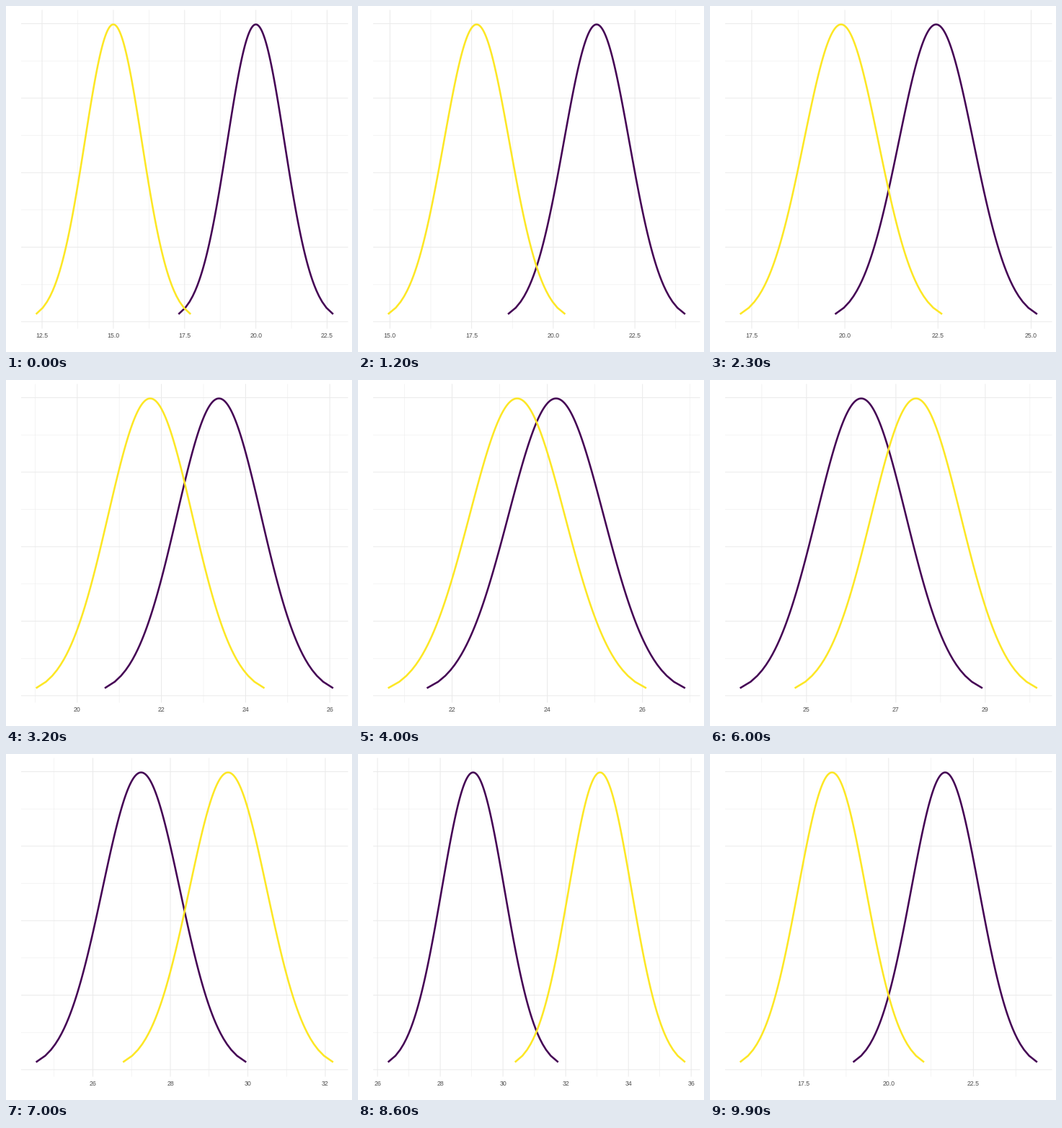
A matplotlib script for the animation above (10 s loop, 480 by 480 pixels).

```python
import numpy as np
import matplotlib.pyplot as plt
from matplotlib.animation import FuncAnimation

plt.rcParams["font.family"] = "Liberation Sans"
plt.rcParams["path.simplify"] = False

SIZE, DPI = 480, 72
FRAMES, INTERVAL = 100, 100
LEFT, RIGHT, TOP, BOTTOM = 21.0, 474.5, 5.5, 447.6
GRID, LABEL = "#EBEBEB", "#4D4D4D"
PURPLE, YELLOW = "#440154", "#FDE725"

# Key times of the drift: 15 evenly spaced states, then a fast return.
STEPS = [6] + [7] * 10 + [6] * 4
KEY_TIMES = np.concatenate([[0], np.cumsum(STEPS)])
KEY_SHIFTS = np.append(np.linspace(0, 10, 15), 0)


def density(z):
    return np.exp(-z ** 2 / 2) / np.sqrt(2 * np.pi)


def bell_points(n=300):
    """Standard normal curve sampled at evenly spaced quantiles."""
    z = np.linspace(-6, 6, 24001)
    d = density(z)
    cdf = np.concatenate([[0], np.cumsum((d[1:] + d[:-1]) / 2)])
    q = np.interp(np.arange(1, n) / n, cdf / cdf[-1], z)
    return q, density(q)


Z, D = bell_points()


def expand(lo, hi):
    pad = 0.05 * (hi - lo)
    return lo - pad, hi + pad


def scaler(lo, hi, a, b):
    return lambda v: a + (np.asarray(v) - lo) / (hi - lo) * (b - a)


to_y = scaler(*expand(D.min(), D.max()), BOTTOM, TOP)


def nice_ticks(lo, hi, m=5):
    """Extended Wilkinson labelling: returns first tick, step and count."""
    nice = [1, 5, 2, 2.5, 4, 3]
    span = hi - lo
    best, pick = -np.inf, None
    for j in (1, 2, 3):
        for i, q in enumerate(nice):
            simple = 1 - i / (len(nice) - 1) - j
            for k in range(2, 11):
                for power in (0.1, 1, 10):
                    step = j * q * power
                    width = step * (k - 1)
                    if width > 2 * span or width < span / 3:
                        continue
                    first = int(np.floor(hi / step)) * j - (k - 1) * j
                    last = int(np.ceil(lo / step)) * j
                    for start in range(first, last + 1):
                        a = start * step / j
                        b = a + width
                        cover = 1 - 0.5 * ((hi - b) ** 2 + (lo - a) ** 2) / (0.1 * span) ** 2
                        r = (k - 1) / width
                        rt = (m - 1) / (max(b, hi) - min(a, lo))
                        dense = 2 - max(r / rt, rt / r)
                        score = 0.25 * simple + 0.2 * cover + 0.5 * dense
                        if score > best + 1e-12:
                            best, pick = score, (a, step, k)
    return pick


def breaks(lo, hi):
    a, step, k = nice_ticks(lo, hi)
    major = a + step * np.arange(k)
    minor = a + step * (np.arange(-1, k) + 0.5)
    keep = lambda v: v[(v >= lo) & (v <= hi)]
    return keep(major), keep(minor)


fig = plt.figure(figsize=(SIZE / DPI, SIZE / DPI), dpi=DPI, facecolor="white")
ax = fig.add_axes([0, 0, 1, 1])


def grid(xs, ys, width):
    style = dict(colors=GRID, linewidths=width, snap=False)
    ax.hlines(to_y(ys), LEFT, RIGHT, **style)
    ax.vlines(xs, TOP, BOTTOM, **style)


def draw(frame):
    ax.cla()
    ax.axis("off")

    shift = np.interp(frame, KEY_TIMES, KEY_SHIFTS)
    purple, yellow = 20 + shift, 15 + 2 * shift
    lo, hi = expand(min(purple, yellow) + Z[0], max(purple, yellow) + Z[-1])
    to_x = scaler(lo, hi, LEFT, RIGHT)
    major, minor = breaks(lo, hi)

    grid(to_x(minor), np.arange(0.05, 0.4, 0.1), 0.53)
    grid(to_x(major), np.arange(5) * 0.1, 1.07)

    for mean, color in ((purple, PURPLE), (yellow, YELLOW)):
        ax.plot(to_x(mean + Z), to_y(D), color=color, lw=2.56, snap=False,
                solid_capstyle="butt", solid_joinstyle="round")

    digits = 0 if np.allclose(major, np.round(major)) else 1
    for v in major:
        ax.text(to_x(v), 460, f"{v:.{digits}f}", size=8.8, color=LABEL,
                ha="center", va="baseline")

    ax.set_xlim(0, SIZE)
    ax.set_ylim(SIZE, 0)
    return []


anim = FuncAnimation(fig, draw, frames=FRAMES, interval=INTERVAL,
                     init_func=lambda: [], repeat=True, repeat_delay=0)
plt.show()
```
